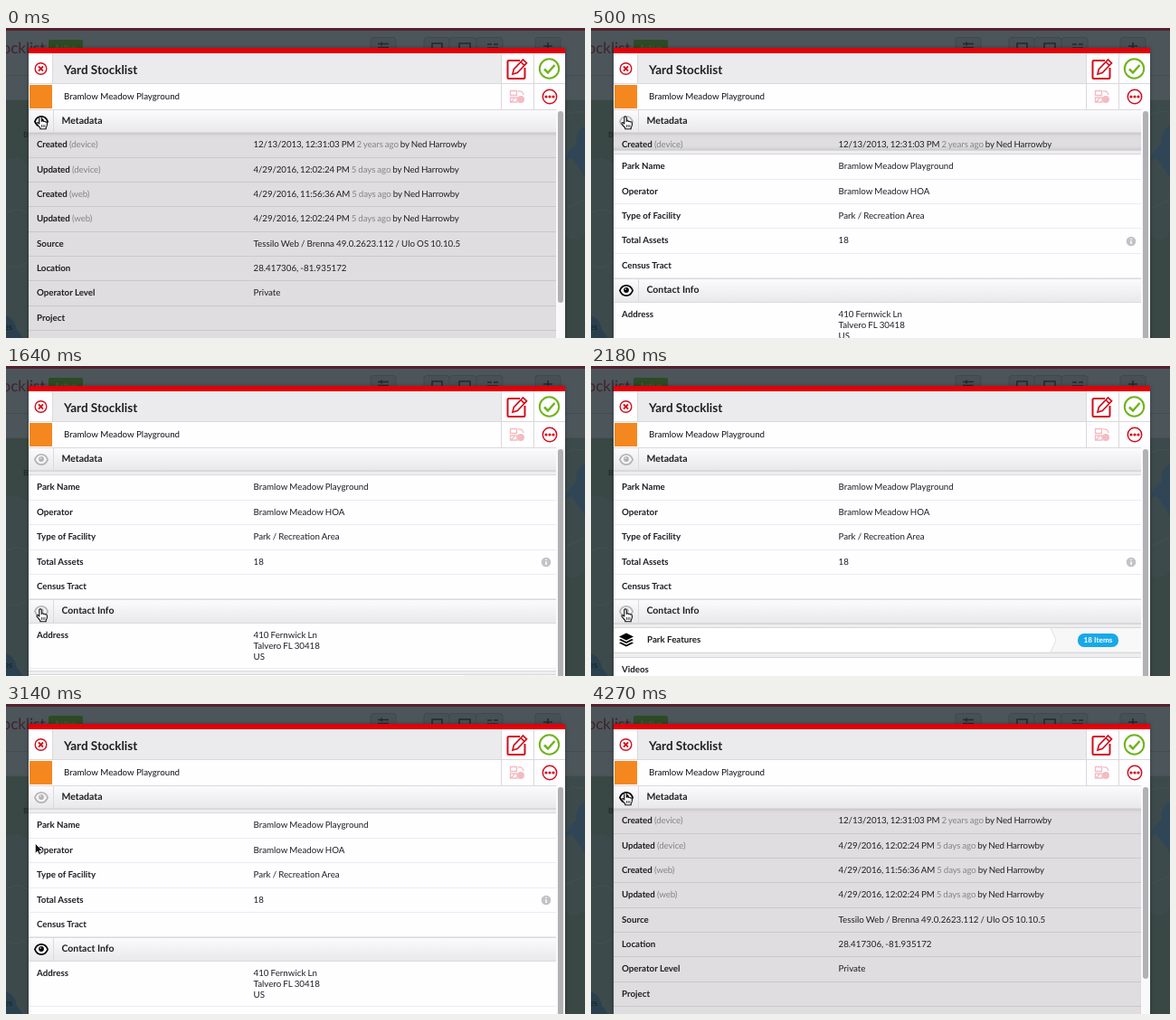
An HTML page that plays this animation: 640 px wide and 343 px high, repeating every 4370 ms.

```html
<!DOCTYPE html>
<html lang="en">
<head>
<meta charset="utf-8">
<title>Record panel</title>
<style>
html, body { margin: 0; width: 100%; height: 100%; overflow: hidden; }
body { position: relative; background: #4c555a; font: 9.75px Lato, sans-serif; color: #1f1f20; text-rendering: geometricPrecision; }
svg, .abs { position: absolute; }
svg { overflow: visible; }
#page { left: 0; top: 0; }
#modal { left: 25px; top: 22px; width: 593px; height: 330px; background: #fefdff; overflow: hidden; border-top: 6px solid #de0209; box-sizing: border-box; }
#shade { left: 25px; top: 22px; width: 593px; height: 330px; box-shadow: 0 0 4px rgba(0,0,0,.3); }
#title { left: 0; top: 0; width: 593px; height: 34px; background: #ebeaec; border-bottom: 1px solid #d9d8da; box-sizing: border-box; }
#title b { position: absolute; left: 39px; font-size: 13.5px; line-height: 36px; }
#name { left: 39px; top: 34px; line-height: 28px; color: #111; }
.cell { background: #fefdff; border: 0 solid #d9d9d9; box-sizing: border-box; }
#list { left: 0; top: 62px; width: 583px; }
.head { position: relative; box-sizing: border-box; border: 1px solid #dadadb; border-width: 1px 0; background: linear-gradient(#fbfafc, #e9e8ea); font-size: 10.5px; font-weight: 700; }
.head b { position: absolute; left: 36.5px; line-height: 25px; }
.head::before { content: ""; position: absolute; left: 26.5px; top: 0; bottom: 0; border-left: 1px solid #dadadb; }
.row { position: relative; height: 27.35px; box-sizing: border-box; border-bottom: 1px solid #ebeaec; line-height: 27px; white-space: nowrap; }
.row > b { position: absolute; left: 9px; }
.row > span { position: absolute; left: 248.5px; word-spacing: -.4px; }
.row i { font-style: normal; font-weight: 400; color: #848486; }
.fold { position: relative; overflow: hidden; }
#meta { background: #dfdde0; }
#meta .row { border-color: #c9c8ca; }
#meta .stamp { letter-spacing: -.1px; }
#meta::after { content: ""; position: absolute; inset: 0; box-shadow: inset 0 4px 4px -3px rgba(0,0,0,.15), inset 0 -4px 4px -3px rgba(0,0,0,.12); }
.gap { height: 5.2px; box-sizing: border-box; background: #eeedef; border: 1px solid #d8d7d9; border-width: 1px 0; }
#addr { height: 50px; }
#addr span { top: 7.5px; line-height: 12px; }
#feat { background: linear-gradient(90deg, #eee, #f8f8f8); }
#feat > b { left: 37px; }
#count { left: 513px; top: 6px; width: 45px; height: 14.5px; border-radius: 7px; background: #18a8ea; color: #fff; font: 700 8.25px/14px Lato, sans-serif; text-align: center; }
#track { left: 583px; top: 62px; width: 10px; height: 300px; background: #f9f8fa; }
#thumb { left: 1.5px; top: 2px; width: 6.5px; border-radius: 3.5px; background: #b1b0b2; }
</style>
</head>
<body>
<svg id="page" width="640" height="343"></svg>
<div id="shade" class="abs"></div>
<div id="modal" class="abs">
  <div id="title" class="abs"><b>Yard Stocklist</b></div>
  <div id="name" class="abs">Bramlow Meadow Playground</div>
  <div class="abs cell" style="left:0;top:0;width:27px;height:34px;border-width:0 1px 1px 0"></div>
  <div class="abs" style="left:1px;top:35px;width:25px;height:26px;background:#f5871f"></div>
  <div class="abs cell" style="left:522px;top:0;width:36px;height:62px;border-width:0 0 0 1px"></div>
  <div class="abs cell" style="left:557.5px;top:0;width:36px;height:62px;border-width:0 0 0 1px"></div>
  <div class="abs" style="left:522px;top:33px;width:71px;height:1px;background:#d9d9d9"></div>
  <svg id="tools" width="593" height="62" style="left:0;top:0"></svg>
  <div id="list" class="abs"></div>
  <div id="track" class="abs"><div id="thumb" class="abs"></div></div>
</div>
<svg id="cursor" width="1" height="1" style="left:0;top:0">
  <path id="arrow" d="M0 0V11.2L2.6 8.8L4.4 12.7L6.3 11.9L4.6 8.1H8.1Z" fill="#111" stroke="#fff" stroke-width=".8"/>
  <g id="hand" stroke="#111" stroke-linejoin="round" stroke-linecap="round">
    <path d="M-1.2 1Q-.9 -.4 .3 0Q1.3 .3 1.3 1.6V5.2Q2.8 4.3 3.6 5.4Q5 4.8 5.6 6Q7.3 5.6 7.4 7.3V9.2Q7.2 11 6.2 12.1V13.8H-.2V12.5Q-2 10.8 -4 7.9Q-4.3 6.3 -2.7 6.6L-1.2 8Z" fill="#fff" stroke-width="1.1"/>
    <path d="M1.5 9.4V11.6M3.2 9.4V11.6M4.9 9.4V11.6" fill="none" stroke-width=".7"/>
  </g>
</svg>
<script>
const $ = id => document.getElementById(id);
const LOOP = 4370, SLIDE = 520, META_H = 300, CONTACT_H = 77;

// Dimmed page behind the panel
const button = (x, w, glyph) =>
  `<rect x="${x}" y="10.5" width="${w}" height="20" rx="3" fill="#475055" stroke="#40484d"/>
   <path d="${glyph}" fill="none" stroke="#23292d" stroke-width="1.6"/>`;
$('page').innerHTML = `
  <rect width="640" height="3" fill="#54202c"/>
  <path d="M0 52.5H640M0 80H640" stroke="#434c51"/>
  <rect y="80" width="640" height="263" fill="#3c4a4b"/>
  <path d="M0 80H25V150Q12 140 0 146ZM618 230Q632 240 640 226V343H618Z" fill="#394844"/>
  <path d="M640 108Q628 116 631 128Q620 136 618 147L625 144Q636 158 640 166Z" fill="#304656"/>
  <path d="M0 318Q10 322 12 334L19 343H0Z" fill="#2b404e"/>
  <path d="M0 205Q14 196 25 206M0 262Q12 270 25 258M618 200L640 190M618 96Q630 90 640 94" fill="none" stroke="#435150"/>
  <g font-family="Lato, sans-serif">
    <text x="43.500" y="28" font-size="17" text-anchor="end" fill="#3f232c">Yard Stocklist</text>
    <rect x="47" y="13" width="38" height="18" rx="2" fill="#2d4a25"/>
    <text x="66" y="25" font-size="9" text-anchor="middle" fill="#486344">Active</text>
    <text x="19" y="121" font-size="8.5" fill="#1b2326">B</text>
    <text x="-2" y="334" font-size="9.5" fill="#141e26">es</text>
  </g>
  ${button(403, 28, 'M411 17.5H423M411 21.5H423M415 15.5V19.5')}
  ${button(462, 28, 'M471 17H482V26H471Z')}
  ${button(490, 30, 'M501 17H513V26H501Z')}
  ${button(520, 29, 'M532 18H537M539 18H544M532 22H544')}
  ${button(585, 28, 'M599 16V26M594 20H604')}`;

$('tools').innerHTML = `
  <g fill="none" stroke="#d20d1b" stroke-width="1.4">
    <circle cx="13.5" cy="17" r="6.3"/><path d="M11 14.5L16 19.5M16 14.5L11 19.5" stroke-width="1.8"/>
    <path d="M543 8H531Q529.500 8 529.500 9.500V26.500Q529.500 28 531 28H547Q548.500 28 548.500 26.500V16" stroke-width="2"/>
    <path d="M535 23L536.300 17.600L546.500 7L550.500 10.800L540.300 21.500ZM544 9.500L548 13.400" stroke-width="1.7"/>
    <circle cx="576" cy="48" r="7.700" stroke-width="1.500"/>
  </g>
  <g fill="#d20d1b"><circle cx="572" cy="48" r="1.600"/><circle cx="576" cy="48" r="1.600"/><circle cx="580" cy="48" r="1.600"/></g>
  <g fill="none" stroke="#70b31c" stroke-width="2"><circle cx="575.500" cy="17" r="10.700"/><path d="M570 17.500L574 21.500L581.500 13" stroke-width="2.500"/></g>
  <g fill="none" stroke="#f2bcc1" stroke-width="1.300">
    <path d="M532.500 41.500H539.500V46.500H532.500ZM532.500 49H540V54H532.500ZM533 54L537 50"/>
    <circle cx="544" cy="51" r="3.300" fill="#f2bcc1"/><path d="M541 42Q546 41 547 46"/>
  </g>`;

// List contents
const row = (label, value = '', extra = '', cls = '') =>
  `<div class="row ${cls}"><b>${label}</b><span>${value}</span>${extra}</div>`;
const stamp = (label, by, time, ago) =>
  row(`${label} <i>(${by})</i>`, `${time} <i>${ago} ago</i> by Ned Harrowby`, '', 'stamp');
const head = (id, label, h) => `<div class="head" style="height:${h}px"><b>${label}</b>
  <svg id="${id}" width="16" height="13" style="left:5.500px;top:6px">
    <path d="M.9 6.500Q3 .9 8 .9T15.100 6.500Q13 12.100 8 12.100T.9 6.500Z" fill="#fff" stroke="#000" stroke-width="1.800"/>
    <circle cx="8" cy="6" r="2.900"/><circle cx="7.200" cy="5" r=".8" fill="#fff"/>
  </svg></div>`;
const gap = '<div class="gap"></div>';
const info = `<svg width="12" height="12" style="left:565.500px;top:7.500px">
  <circle cx="6" cy="6" r="5.300" fill="#c3c3c4"/><path d="M6 5.200V9M6 2.800V4.100" stroke="#fff" stroke-width="1.500"/></svg>`;

$('list').innerHTML = head('metaEye', 'Metadata', 26.3) +
  '<div id="meta" class="fold">' +
    stamp('Created', 'device', '12/13/2013, 12:31:03 PM', '2 years') +
    stamp('Updated', 'device', '4/29/2016, 12:02:24 PM', '5 days') +
    stamp('Created', 'web', '4/29/2016, 11:56:36 AM', '5 days') +
    stamp('Updated', 'web', '4/29/2016, 12:02:24 PM', '5 days') +
    row('Source', 'Tessilo Web / Brenna 49.0.2623.112 / Ulo OS 10.10.5') +
    row('Location', '28.417306, -81.935172') +
    row('Operator Level', 'Private') +
    row('Project') +
  '</div>' + gap +
  row('Park Name', 'Bramlow Meadow Playground') +
  row('Operator', 'Bramlow Meadow HOA') +
  row('Type of Facility', 'Park / Recreation Area') +
  row('Total Assets', '18', info) +
  row('Census Tract') +
  head('contactEye', 'Contact Info', 26.7) +
  `<div id="contact" class="fold"><div class="row" id="addr"><b>Address</b>
    <span>410 Fernwick Ln<br>Talvero FL 30418<br>US</span></div></div>` + gap +
  `<div class="row" id="feat">
    <svg width="490" height="27" style="left:0;top:0">
      <path d="M0 0H483L489 13.200L483 26.400H0Z" fill="#fff"/><path d="M483 0L489 13.200L483 26.400" fill="none" stroke="#e3e3e3"/>
      <path d="M14 5.500L22 9.500L14 13.500L6 9.500ZM6 13L8 12L14 15L20 12L22 13L14 17ZM6 16.500L8 15.500L14 18.500L20 15.500L22 16.500L14 20.500Z"/>
    </svg><b>Park Features</b><div id="count" class="abs">18 Items</div></div>` + gap +
  row('Videos');

// Motion
const clamp = x => Math.min(1, Math.max(0, x));
const ramp = (t, start, len) => clamp((t - start) / len);
const swing = p => .5 - Math.cos(Math.PI * p) / 2;
const fold = (t, shut, open, len) => 1 - swing(ramp(t, shut, len)) + swing(ramp(t, open, len));

const moves = [ // start, end, from y, to y, sideways bulge, easing
  [640, 1420, 98, 269, 3, swing],
  [2930, 3460, 269, 107, 5, p => 1 - (1 - p) ** 2.43],
  [3500, 3620, 107, 98, 0, swing]
];
function pointer(t) {
  let x = 38, y = 98;
  for (const [a, b, from, to, bulge, ease] of moves) {
    if (t < a) break;
    const p = ramp(t, a, b - a);
    y = from + (to - from) * ease(p);
    x = 38 - bulge * 1.2 * Math.sin(Math.PI * p);
  }
  return [x, y];
}

function draw(t) {
  const meta = META_H * fold(t, 65, 3759, SLIDE);
  const contact = CONTACT_H * fold(t, 1440, 2455, SLIDE);
  $('meta').style.height = meta + 'px';
  $('contact').style.height = contact + 'px';
  $('metaEye').style.opacity = .25 + .75 * fold(t, 50, 3740, 100);
  $('contactEye').style.opacity = .25 + .75 * fold(t, 1420, 2450, 80);
  $('thumb').style.height = 420 * 420 / (455 + meta + contact) + 'px';

  const [x, y] = pointer(t);
  const over = y < 116 || y > 258;
  $('cursor').style.transform = `translate(${x}px, ${y}px)`;
  $('hand').style.display = over ? '' : 'none';
  $('arrow').style.display = over ? 'none' : '';
}

const start = performance.now();
function tick() {
  draw((performance.now() - start) % LOOP);
  requestAnimationFrame(tick);
}
tick();
</script>
</body>
</html>
```
